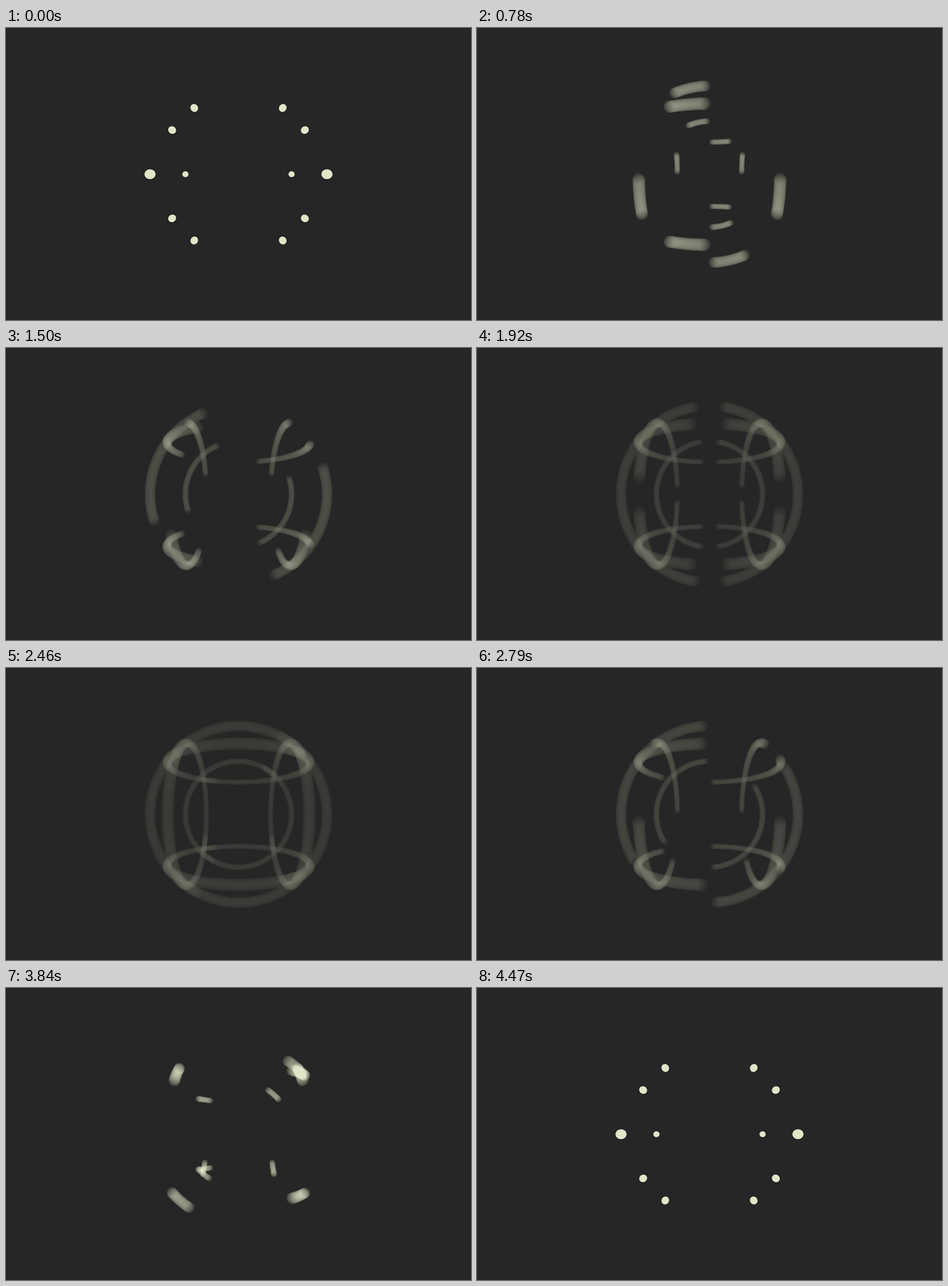
Write an HTML page with a canvas that moves like this. It is 636 px wide and 400 px high and loops after 4500 ms.

```html
<!DOCTYPE html>
<html lang="en">
<head>
<meta charset="utf-8">
<title>Orbiting dots</title>
<style>
  html, body { margin: 0; width: 100%; height: 100%; overflow: hidden; background: #262626; }
  canvas { display: block; }
</style>
</head>
<body>
<canvas id="stage" width="636" height="400"></canvas>
<script>
const LOOP = 4500, STEP = 30, SHUTTER = 72, SAMPLES = 240;
const CX = 318, CY = 200.3;
const RING = 90.75, OFFSET = 60.5, CAMERA = 242, BALL = 5.1;
const GAMMA = 2.2, BACK = [38, 38, 38], DOT = [224, 230, 200];

// The region that the dots can reach
const SIZE = 280, LEFT = 178, TOP = 60;

const ctx = document.getElementById('stage').getContext('2d');
const image = ctx.createImageData(SIZE, SIZE);
const light = new Float32Array(SIZE * SIZE);
const toLinear = c => Math.pow(c / 255, GAMMA);
const backLin = BACK.map(toLinear), dotLin = DOT.map(toLinear);
const clamp = v => Math.min(1, Math.max(0, v));

// Rotation in degrees: slow at both ends, fastest halfway
function halfTurn(t) {
  const x = Math.max(0, t) / (LOOP / 2);
  return 1870 * x ** 3 + 380 * x ** 8;
}
function rotation(t) {
  return t < LOOP / 2 ? halfTurn(t) : 4500 - halfTurn(LOOP - t);
}

// Add one ball in perspective; off-axis balls stretch away from the centre
function addBall(x, y, z, weight) {
  const scale = CAMERA / (CAMERA - z);
  const px = x * scale, py = y * scale;
  const dist = Math.hypot(px, py) || 1;
  const ux = px / dist, uy = py / dist;
  const r = BALL * scale, stretch = Math.hypot(1, dist / CAMERA);
  const cx = px + CX - LEFT, cy = py + CY - TOP;
  const reach = r * stretch + 2;
  const x0 = Math.max(0, Math.floor(cx - reach)), x1 = Math.min(SIZE - 1, Math.ceil(cx + reach));
  const y0 = Math.max(0, Math.floor(cy - reach)), y1 = Math.min(SIZE - 1, Math.ceil(cy + reach));
  for (let j = y0; j <= y1; j++) {
    for (let i = x0; i <= x1; i++) {
      const dx = i + 0.5 - cx, dy = j + 0.5 - cy;
      const along = (dx * ux + dy * uy) / stretch, across = dy * ux - dx * uy;
      const edge = r - Math.sqrt(along * along + across * across);
      if (edge < -1.6) continue;
      const cover = clamp(edge + 0.5);
      const rim = 0.01 * (1 - cover) * clamp(edge + 1.6);
      light[j * SIZE + i] += weight * (cover * cover - rim);
    }
  }
}

// Six rings, one on each side of a cube, with two balls each
function addRings(angle, weight) {
  for (const turn of [0, Math.PI]) {
    const c = RING * Math.cos(angle + turn), s = RING * Math.sin(angle + turn);
    for (const h of [-OFFSET, OFFSET]) {
      addBall(-c, -s, h, weight);
      addBall(-c, h, s, weight);
      addBall(h, c, s, weight);
    }
  }
}

function draw(t) {
  light.fill(0);
  for (let k = 0; k < SAMPLES; k++) {
    const at = t - 5 + SHUTTER * ((k + 0.5) / SAMPLES - 0.5);
    addRings(rotation(at) * Math.PI / 180, 1 / SAMPLES);
  }
  const px = image.data;
  for (let i = 0; i < light.length; i++) {
    const a = Math.min(1, light[i]);
    for (let ch = 0; ch < 3; ch++) {
      px[i * 4 + ch] = a === 0 ? BACK[ch]
        : 255 * Math.pow(Math.max(0, backLin[ch] + a * (dotLin[ch] - backLin[ch])), 1 / GAMMA);
    }
    px[i * 4 + 3] = 255;
  }
  ctx.putImageData(image, LEFT, TOP);
}

ctx.fillStyle = '#262626';
ctx.fillRect(0, 0, 636, 400);

const start = performance.now();
let shown = -1;
function tick() {
  const t = (performance.now() - start + 3) % LOOP;
  const step = Math.floor(t / STEP) * STEP;
  if (step !== shown) draw(shown = step);
  requestAnimationFrame(tick);
}
tick();
</script>
</body>
</html>
```
